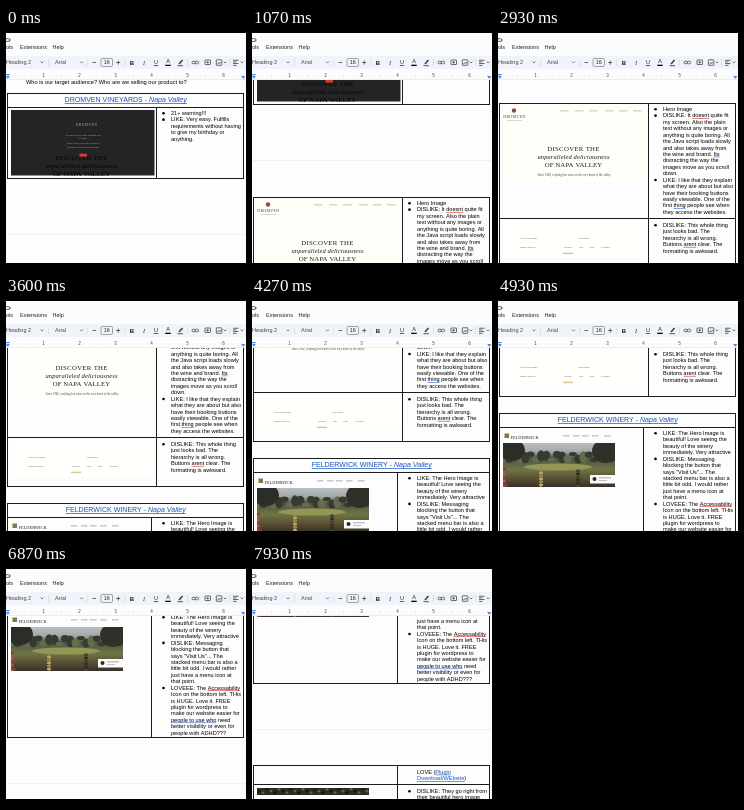
These frames come from a looping animation (240x240 px, 8000 ms). An HTML page with a canvas:

```html
<!DOCTYPE html>
<html lang="en">
<head>
<meta charset="utf-8">
<title>Scrolling document</title>
<style>
html, body { margin: 0; width: 100%; height: 100%; overflow: hidden; background: #000; }
canvas { display: block; width: 240px; height: 240px; }
</style>
</head>
<body>
<canvas id="stage"></canvas>
<script>
const SIZE = 240, LOOP = 8000, STEP = 1000 / 15;
const SANS = '"Liberation Sans", Arial, sans-serif';
const SERIF = '"Liberation Serif", "Times New Roman", serif';
const INK = '#000', BORDER = '#1c1c1c', LINK = '#1155cc', PAPER = '#fdfdfd';
const LEFT = 1.5, RIGHT = 237.5, LEADING = 6.43;

const canvas = document.getElementById('stage');
const ctx = canvas.getContext('2d');
const ratio = window.devicePixelRatio || 1;
canvas.width = canvas.height = SIZE * ratio;

// [step, scroll offset]
const scrollKeys = [[0, 0], [16, 74], [34, 119], [54, 217], [74, 307], [88, 340], [119, 445]];

const cells = [
  { y: 85, lines: ['* 21+ warning!!!', '* LIKE: Very easy. Fulfills', 'requirements without having',
    'to give my birthday or', 'anything.'] },
  { y: 249, lines: ['* Hero Image', '* DISLIKE: It ~doesnt~ quite fit', 'my screen. Also the plain',
    'text without any images or', 'anything is quite boring. All', 'the Java script loads slowly',
    'and also takes away from', 'the wine and brand. ^Its^', 'distracting the way the',
    'images move as you scroll', 'down.', '* LIKE: I like that they explain',
    'what they are about but also', 'have their booking buttons', 'easily viewable. One of the',
    'first ^thing^ people see when', 'they access the websites.'] },
  { y: 365, lines: ['* DISLIKE: This whole thing', 'just looks bad. The', 'hierarchy is all wrong.',
    'Buttons ~arent~ clear. The', 'formatting is awkward.'] },
  { y: 444, lines: ['* LIKE: The Hero Image is', 'beautiful! Love seeing the', 'beauty of the winery',
    'immediately. Very attractive', '* DISLIKE: Messaging', 'blocking the button that',
    'says "Visit Us"... The', 'stacked menu bar is also a', 'little bit odd. I would rather',
    'just have a menu icon at', 'that point.', '* LOVEEE: The ~Accessability~',
    'Icon on the bottom left. THis', 'is HUGE. Love it. FREE', 'plugin for wordpress to',
    'make our website easier for', '^people to use who^ need', 'better visibility or even for',
    'people with ADHD???'] },
  { y: 653, lines: ['LOVE (@Plugin@', '@Download/WEbsite@)'] },
  { y: 672, lines: ['* DISLIKE: They go right from', 'their beautiful hero image'] }
];
const markColors = { '~': '#d93025', '^': '#3367d6', '@': LINK };

function rect(x, y, w, h, color) {
  ctx.fillStyle = color;
  ctx.fillRect(x, y, w, h);
}

function disc(x, y, rx, ry, color) {
  ctx.fillStyle = color;
  ctx.beginPath();
  ctx.ellipse(x, y, rx, ry, 0, 0, Math.PI * 2);
  ctx.fill();
}

function frame(x, y, w, h, r, color) {
  ctx.strokeStyle = color;
  ctx.lineWidth = 0.8;
  ctx.beginPath();
  ctx.roundRect(x, y, w, h, r);
  ctx.stroke();
}

function path(points, color, width = 0.8) {
  ctx.strokeStyle = color;
  ctx.lineWidth = width;
  ctx.beginPath();
  points.forEach(([x, y], i) => i ? ctx.lineTo(x, y) : ctx.moveTo(x, y));
  ctx.stroke();
}

// y is the middle of the capitals; returns the advance width
function text(str, x, y, size, { color = INK, family = SANS, style = '', align = 'left', spacing = 0 } = {}) {
  ctx.font = `${style} ${size}px ${family}`;
  ctx.letterSpacing = spacing + 'px';
  ctx.fillStyle = color;
  const w = ctx.measureText(str).width;
  ctx.fillText(str, align === 'center' ? x - w / 2 : x, y + size * 0.35);
  return w;
}

function cell({ y, lines }) {
  lines.forEach((line, i) => {
    const mid = y + i * LEADING;
    if (line.startsWith('* ')) {
      disc(157.5, mid + 0.2, 1.3, 1.3, INK);
      line = line.slice(2);
    }
    let x = 165, mark = '';
    for (const part of line.split(/([~^@])/)) {
      if (markColors[part]) {
        mark = mark ? '' : part;
      } else if (part) {
        const w = text(part, x, mid, 5.6, { color: mark === '@' ? LINK : INK });
        if (mark) rect(x, mid + 2.6, w, 0.6, markColors[mark]);
        x += w;
      }
    }
  });
}

// rows: y of every horizontal line; the divider starts at the given y
function table(rows, divider, from = rows[0]) {
  const top = rows[0], bottom = rows[rows.length - 1];
  rows.forEach(y => rect(LEFT - 0.5, y - 0.5, RIGHT - LEFT + 1, 1, BORDER));
  [LEFT, RIGHT].forEach(x => rect(x - 0.5, top, 1, bottom - top, BORDER));
  rect(divider - 0.5, from, 1, bottom - from, BORDER);
}

function title(name, y) {
  const size = 7.05, tail = 'Napa Valley', head = name + ' - ';
  ctx.letterSpacing = '0px';
  ctx.font = `${size}px ${SANS}`;
  const w1 = ctx.measureText(head).width;
  ctx.font = `italic ${size}px ${SANS}`;
  const w = w1 + ctx.measureText(tail).width, x = 119.7 - w / 2;
  text(head, x, y, size, { color: LINK });
  text(tail, x + w1, y, size, { color: LINK, style: 'italic' });
  rect(x, y + 3.3, w, 0.7, LINK);
}

function slogan(y, color) {
  const look = { color, family: SERIF, align: 'center' };
  text('DISCOVER THE', 75.5, y, 6.8, { ...look, spacing: 0.3 });
  text('unparalleled deliciousness', 75.5, y + 8, 6.5, { ...look, style: 'italic', spacing: 0.1 });
  text('OF NAPA VALLEY', 75.5, y + 16, 6.8, { ...look, spacing: 0.1 });
}

function dashes(xs, y, w, color, h = 0.8) {
  xs.forEach(x => rect(x, y, w, h, color));
}

function ageGate() {
  rect(5, 82, 143.5, 65.5, '#242426');
  slogan(129.5, '#050505');
  text('DROMVEN', 80.5, 97, 3.6, { color: '#aaa', family: SERIF, align: 'center', spacing: 0.5 });
  const look = { color: '#a5a5a5', family: SERIF, align: 'center' };
  text('You must be of legal drinking age', 77, 107, 2.6, look);
  text('to enter.', 77, 110.5, 2.6, look);
  text('Please enter your date of birth to', 77, 115.5, 2.5, look);
  text('continue on to our website today', 77, 119, 2.5, look);
  rect(73.5, 125.7, 7.5, 3, '#d33a2c');
}

function heroPage() {
  rect(4, 246, 145, 75, '#fffffa');
  disc(16, 250.5, 2.2, 2.2, '#80504a');
  text('DROMVEN', 16.3, 256.5, 4, { color: '#553b3b', family: SERIF, align: 'center', spacing: 0.25 });
  rect(9, 260, 15, 0.5, '#b9a6a0');
  dashes([62, 77, 91, 107, 121, 135], 250.5, 8.5, '#c3aaa6');
  slogan(288.5, '#1c1c1c');
  text('Since 1982, crafting fine wines in the very heart of the valley', 76, 314.5, 3,
    { color: '#444', family: SERIF, style: 'italic', align: 'center' });
}

function formPage() {
  rect(4, 361, 145, 36, '#fffffb');
  const look = { color: '#666', family: SERIF };
  text('Your first name', 22, 378, 2.8, look);
  text('Last name', 80, 378, 2.8, look);
  text('Email address', 22, 387, 2.8, look);
  text('Month', 66, 387, 2.8, look);
  text('Day', 81, 387, 2.8, look);
  text('Year', 91, 387, 2.8, look);
  text('Country', 103, 387, 2.8, look);
  rect(65, 392.7, 10, 1.4, '#dcc48c');
}

function landscape(y, h) {
  const g = ctx.createLinearGradient(0, y, 0, y + h);
  [[0, '#b9bec4'], [0.2, '#a3a8a6'], [0.34, '#4d5242'], [0.6, '#6f7446'], [0.85, '#54492f'], [1, '#35302a']]
    .forEach(([at, color]) => g.addColorStop(at, color));
  ctx.save();
  ctx.beginPath();
  ctx.rect(5, y, 112, h);
  ctx.clip();
  rect(5, y, 112, h, g);
  for (let i = 0; i < 22; i++) {
    disc(6 + i * 5.3, y + 14 + 3 * Math.sin(i * 2.3), 4, 4 + 2 * Math.cos(i * 1.7), i % 3 ? '#353b30' : '#666b4c');
  }
  disc(14, y + 7, 13, 11, '#2a2d28');
  disc(108, y + 8, 14, 12, '#302f29');
  disc(60, y + 24, 34, 3.5, '#929756');
  const blooms = ['#a45e3c', '#c6a062', '#3f4a2c', '#7d4239', '#878a50', '#2f3127'];
  for (let i = 0; i < 80; i++) {
    disc(6 + (i * 37) % 111, y + 26 + (i * 13) % 21, 2, 1.3, blooms[i % blooms.length]);
  }
  ctx.restore();
}

function wineryPage() {
  rect(6.5, 444.5, 4.5, 4.5, '#8b7440');
  text('FELDERWICK', 12.5, 448, 4.4, { color: '#222', family: SERIF });
  dashes([65, 75, 84, 94, 106], 446.5, 6.5, '#999');
  landscape(454, 44);
  rect(92, 486, 25, 8.5, '#fbfbfb');
  disc(96.5, 490, 2, 2, '#2d2527');
  dashes([101], 488.5, 12, '#888', 0.7);
  dashes([101], 491, 8, '#aaa', 0.7);
  disc(8, 496, 1.8, 1.8, '#8c3344');
}

// only the dark treetops of the next picture are in view
function treetops() {
  rect(5, 669, 112, 7, '#2b2c24');
  for (let i = 0; i < 28; i++) {
    disc(7 + i * 4, 672 + 2 * Math.sin(i * 2.1), 1.5, 1.2, i % 2 ? '#6e6039' : '#14150f');
  }
}

function pageDocument() {
  text('Who is our target audience? Who are we selling our product to?', 20, 54, 5.7);
  title('DROMVEN VINEYARDS', 72);
  ageGate();
  heroPage();
  formPage();
  title('FELDERWICK WINERY', 431);
  wineryPage();
  treetops();
  table([65.5, 79.5, 150.5], 150.5, 79.5);
  table([243.5, 358.5, 407.5], 150.5);
  table([424.5, 438.5, 564.5], 145.5, 438.5);
  table([646.5, 665.5, 760.5], 145.5);
  cells.forEach(cell);
  [206, 610].forEach(y => rect(0, y, SIZE, 1, '#f0f1f3'));
}

function caret(x) {
  path([[x - 1.4, 33.6], [x, 35], [x + 1.4, 33.6]], '#444', 0.7);
}

function toolbar() {
  const grey = '#444746', dark = '#222';
  rect(0, 5, SIZE, 47, '#fbfcfd');
  disc(1.5, 12, 3, 1.8, grey);
  disc(1.5, 12, 2, 1, '#fbfcfd');
  text('ols', 0, 19.5, 5.5, { color: dark });
  text('Extensions', 14, 19.5, 5.5, { color: dark });
  text('Help', 46.5, 19.5, 5.5, { color: dark });

  rect(0, 28, SIZE, 13, '#f0f4fa');
  [42, 81.5, 118.5, 181, 223.3].forEach(x => rect(x, 31, 0.6, 7, '#d0d2d5'));
  [36, 75.5, 219, 236].forEach(caret);
  text('Heading 2', 0, 34.5, 5.5, { color: grey });
  text('Arial', 49, 34.5, 5.5, { color: grey });
  rect(86.5, 34.2, 3.6, 0.8, grey);
  frame(95, 30.5, 11.5, 8, 1.3, '#8c8f8d');
  text('16', 100.8, 34.6, 5.4, { color: dark, align: 'center' });
  rect(110.2, 34.2, 4, 0.8, grey);
  rect(111.8, 32.6, 0.8, 4, grey);

  text('B', 126, 34.5, 6, { color: dark, style: 'bold', align: 'center' });
  text('I', 138, 34.5, 6, { color: dark, style: 'italic', align: 'center', family: SERIF });
  text('U', 150, 34, 5.6, { color: dark, align: 'center' });
  rect(147.8, 37.2, 4.4, 0.7, dark);
  text('A', 162, 33.5, 5.6, { color: dark, align: 'center' });
  rect(159.3, 36.7, 5.4, 1.3, INK);
  path([[173, 36], [176.5, 32]], grey, 1.7);
  rect(171.5, 37.3, 5.5, 0.9, grey);

  frame(186, 33.2, 3.4, 2.6, 1.3, grey);
  frame(189.3, 33.2, 3.4, 2.6, 1.3, grey);
  frame(199, 32, 5.5, 4.5, 0.4, grey);
  path([[201.7, 33], [201.7, 35.6]], grey);
  path([[200.4, 34.3], [203, 34.3]], grey);
  frame(210.3, 31.8, 5.5, 5.5, 0.5, grey);
  path([[211.3, 36.3], [212.8, 34.5], [213.7, 35.5], [214.7, 34]], grey);
  [0, 1, 2, 3].forEach(i => rect(227, 31.8 + i * 1.7, i % 2 ? 3.5 : 5.5, 0.8, grey));

  rect(0, 43.5, SIZE, 8, PAPER);
  rect(0, 51, SIZE, 0.6, '#e2e4e8');
  for (let i = 1; i < 53; i++) {
    const x = 1.5 + i * 4.5;
    if (i % 8) rect(x, i % 4 ? 47.5 : 46.8, 0.5, i % 4 ? 1 : 2.2, '#c9cbcf');
    else text(String(i / 8), x, 47.8, 4.5, { color: '#444', align: 'center' });
  }
  rect(0, 46, 3.6, 1.2, '#4285f4');
  [1.9, 237.3].forEach(x => {
    ctx.fillStyle = '#4285f4';
    ctx.beginPath();
    ctx.moveTo(x - 1.9, 48);
    ctx.lineTo(x + 1.9, 48);
    ctx.lineTo(x, 51);
    ctx.fill();
  });
}

function scrollAt(step) {
  let i = 1;
  while (i < scrollKeys.length - 1 && step > scrollKeys[i][0]) i++;
  const [a, from] = scrollKeys[i - 1], [b, to] = scrollKeys[i];
  return from + (to - from) * Math.min(1, (step - a) / (b - a));
}

function draw(time) {
  const step = Math.min(119, Math.floor((time % LOOP + 4) / STEP));
  ctx.setTransform(ratio, 0, 0, ratio, 0, 0);
  rect(0, 0, SIZE, SIZE, PAPER);
  ctx.save();
  ctx.translate(0, -Math.round(scrollAt(step)));
  pageDocument();
  ctx.restore();
  toolbar();
  rect(0, 0, SIZE, 5, '#000');
  rect(0, 235, SIZE, 5, '#000');
}

const start = performance.now();
function tick() {
  draw(performance.now() - start);
  requestAnimationFrame(tick);
}
tick();
</script>
</body>
</html>
```
